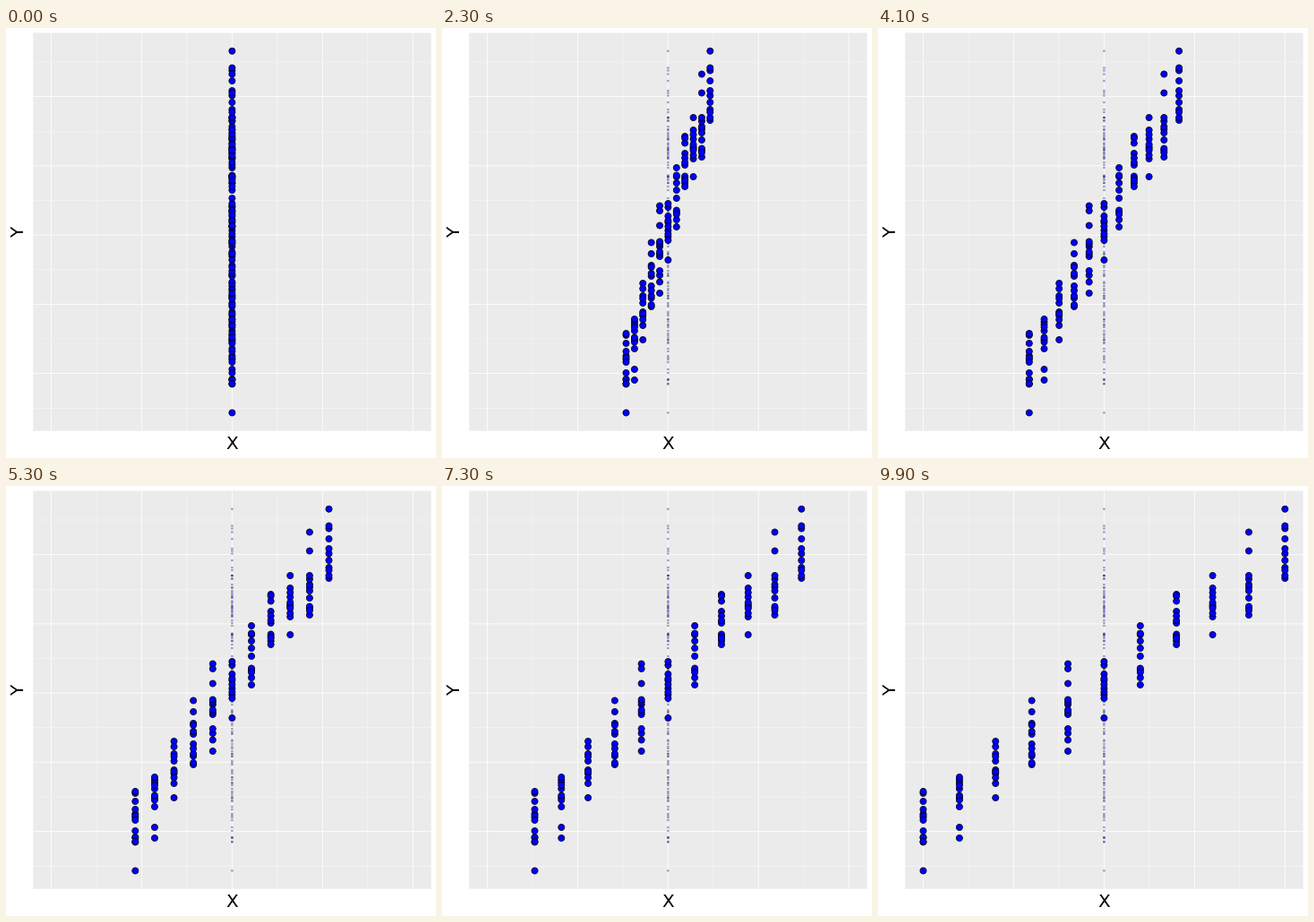
Write a matplotlib script that moves like this. It is 480 by 480 pixels and loops after 10 s.

```python
import random

import matplotlib.pyplot as plt
import numpy as np
from matplotlib.animation import FuncAnimation
from matplotlib.patches import Rectangle

SIZE, DPI, FRAMES = 480, 96, 100
PT = 72 / DPI  # points per pixel

LEFT, TOP, RIGHT, BOTTOM = 30.3, 5.5, 474.5, 449.7
CX, CY = (LEFT + RIGHT) / 2, (TOP + BOTTOM) / 2
STEP = (RIGHT - LEFT) / 11

# Heights of the points in each of the eleven groups, left to right
GROUPS = [
    [341, 343, 352, 361, 366, 368, 370, 373, 385, 392, 392.5, 397, 397.5, 429.5],
    [325, 328, 331, 334, 338, 345.5, 348, 350.5, 358, 381, 393],
    [285, 291, 299, 302, 307, 317, 319, 321, 325.5, 332, 348],
    [239.5, 252, 265, 267, 274, 277, 288, 293, 299, 301.5, 309, 311],
    [198.5, 204, 220.5, 238.5, 241, 244, 250, 252.5, 255, 271, 276, 283.5, 296],
    [196, 200, 210, 215, 217, 221.5, 226, 230, 233, 237, 259],
    [156, 164.5, 166, 173, 181, 190, 203.5, 205.5, 208, 214, 222],
    [121, 123, 128.5, 140, 145, 150, 153, 165.5, 168, 170, 173, 177],
    [100, 114, 119, 124, 130, 132.5, 134.5, 136.5, 142, 146, 166],
    [51.5, 72.5, 100, 104, 110, 113, 117, 125, 134.5, 136.5, 139, 144],
    [25.7, 44.5, 47.5, 59, 70, 75.5, 83, 91, 94, 100, 103],
]
points = [(i - 5, y) for i, ys in enumerate(GROUPS) for y in ys]
random.Random(4).shuffle(points)
offset, height = np.array(points).T

fig = plt.figure(figsize=(SIZE / DPI, SIZE / DPI), dpi=DPI, facecolor="white")
ax = fig.add_axes([0, 0, 1, 1])
ax.set(xlim=(0, SIZE), ylim=(SIZE, 0))
ax.axis("off")


def grid(xs, ys, width):
    style = dict(color="white", lw=width * PT, snap=False,
                 solid_capstyle="butt", zorder=1)
    for x in xs:
        ax.plot([x, x], [TOP, BOTTOM], **style)
    for y in ys:
        ax.plot([LEFT, RIGHT], [y, y], **style)


def dots(size, alpha, zorder):
    n = len(height)
    return ax.scatter(np.full(n, CX), height, s=(size * PT) ** 2,
                      c=["blue"] * n, edgecolors=["black"] * n,
                      linewidths=0.71 * PT, alpha=alpha, zorder=zorder)


def label(text, x, y, angle=0):
    ax.text(x, y, text, fontsize=20 * PT, family="DejaVu Sans", ha="center",
            va="baseline", rotation=angle, rotation_mode="anchor")


ax.add_patch(Rectangle((LEFT, TOP), RIGHT - LEFT, BOTTOM - TOP,
                       fc="#ebebeb", lw=0, snap=False, zorder=0))
grid(CX + 2.5 * STEP * np.array([-1.5, -0.5, 0.5, 1.5]),
     38 + 77.25 * np.arange(6), 0.4)
grid(CX + 2.5 * STEP * np.arange(-2, 3), 76.6 + 77.25 * np.arange(5), 0.8)
label("X", CX, 469.8)
label("Y", 20.1, CY, 90)

dots(1.78, 0.3, 2)
moving = dots(7.11, 1, 3)


def update(frame):
    spread = STEP * frame / (FRAMES - 1)
    moving.set_offsets(np.column_stack([CX + offset * spread, height]))
    return [moving]


anim = FuncAnimation(fig, update, frames=FRAMES, interval=100,
                     repeat=True, repeat_delay=0)
plt.show()
```
